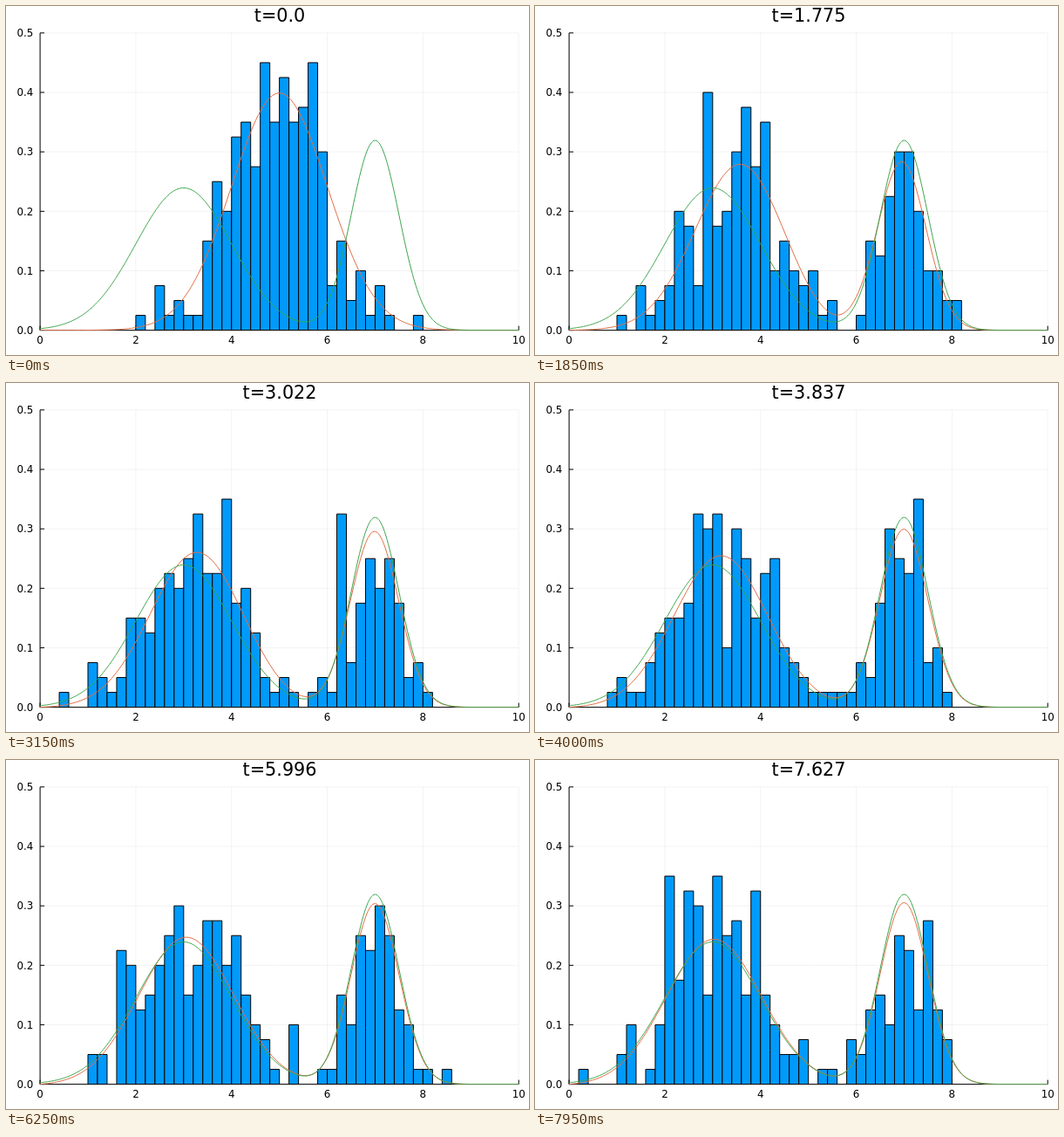
Animation, 600 px wide and 400 px high, one loop 8 s. Source, as an HTML page with a canvas:

```html
<!DOCTYPE html>
<html lang="en">
<head>
<meta charset="utf-8">
<title>Langevin sampling</title>
<style>
  html, body { margin: 0; width: 100%; height: 100%; overflow: hidden; background: #fff; }
  canvas { display: block; }
</style>
</head>
<body>
<canvas id="stage" width="600" height="400"></canvas>
<script>
const ctx = document.getElementById('stage').getContext('2d');
const STEPS = 160, STEP_MS = 50, DT = 0.047968;
const LEFT = 39.1, RIGHT = 588.19, TOP = 30.87, BOTTOM = 371.61;
const px = x => LEFT + x * (RIGHT - LEFT) / 10;
const py = y => BOTTOM - y * (BOTTOM - TOP) / 0.5;

const normal = (x, mean, sd) =>
  Math.exp(-(((x - mean) / sd) ** 2) / 2) / (sd * Math.sqrt(2 * Math.PI));
const leftPart = x => 0.6 * normal(x, 3, 1);
const rightPart = x => 0.4 * normal(x, 7, 0.5);
const target = x => leftPart(x) + rightPart(x);
const score = x => (leftPart(x) * (3 - x) + rightPart(x) * 4 * (7 - x)) / target(x);

// Density of dX = score/2 dt + dW on [0, 10], held at zero on both ends.
function solveDensity() {
  const dx = 0.05, count = 201, substeps = 40;
  const rate = 0.5 * DT / substeps / dx ** 2;
  const xs = Array.from({ length: count }, (_, i) => i * dx);
  const stationary = xs.map(target);
  const between = xs.map(x => target(x + dx / 2));
  const density = xs.map(x => normal(x, 5, 1));
  const history = [];
  for (let step = 0; step < STEPS; step++) {
    history.push(density.map((y, i) => [xs[i], y]));
    for (let s = 0; s < substeps; s++) {
      let inflow = 0;
      for (let i = 0; i < count - 1; i++) {
        const outflow = rate * between[i] *
          (density[i] / stationary[i] - density[i + 1] / stationary[i + 1]);
        density[i] += inflow - outflow;
        inflow = outflow;
      }
      density[0] = density[count - 1] = 0;
    }
  }
  return history;
}

function seededRandom(seed) {
  return () => {
    seed = (seed + 0x6D2B79F5) | 0;
    let h = Math.imul(seed ^ (seed >>> 15), 1 | seed);
    h = (h + Math.imul(h ^ (h >>> 7), 61 | h)) ^ h;
    return ((h ^ (h >>> 14)) >>> 0) / 4294967296;
  };
}

// Histogram of 200 walkers; the first bin of the starting counts is [2, 2.2).
function simulateWalkers() {
  const random = seededRandom(12);
  const gauss = () => Math.sqrt(-2 * Math.log(1 - random())) * Math.cos(2 * Math.PI * random());
  const startCounts = [1, 0, 3, 1, 2, 1, 1, 6, 10, 8, 13, 14, 11, 18, 14,
                       17, 14, 15, 18, 12, 3, 6, 2, 4, 1, 3, 1, 0, 0, 1];
  let walkers = startCounts.flatMap((n, bin) =>
    Array.from({ length: n }, () => 2 + 0.2 * (bin + 0.02 + 0.96 * random())));
  const history = [];
  for (let step = 0; step < STEPS; step++) {
    const bins = new Array(50).fill(0);
    for (const x of walkers) {
      const bin = Math.floor(x * 5);
      if (bin >= 0 && bin < 50) bins[bin]++;
    }
    history.push(bins);
    walkers = walkers.map(x => x + score(x) / 2 * DT + Math.sqrt(DT) * gauss());
  }
  return history;
}

const densities = solveDensity();
const histograms = simulateWalkers();
const targetCurve = Array.from({ length: 401 }, (_, i) => [i / 40, target(i / 40)]);

function line(x1, y1, x2, y2, color, width) {
  ctx.strokeStyle = color;
  ctx.lineWidth = width;
  ctx.beginPath();
  ctx.moveTo(x1, y1);
  ctx.lineTo(x2, y2);
  ctx.stroke();
}

function curve(points, color) {
  ctx.strokeStyle = color;
  ctx.lineWidth = 1;
  ctx.beginPath();
  for (const [x, y] of points) ctx.lineTo(px(x), py(y));
  ctx.stroke();
}

function text(label, x, y, size, align) {
  ctx.font = `${size}px "DejaVu Sans", sans-serif`;
  ctx.textAlign = align;
  ctx.fillStyle = '#000';
  ctx.fillText(label, x, y);
}

function drawAxes() {
  const grid = 'rgba(0,0,0,0.1)';
  for (let i = 0; i <= 5; i++) {
    const x = px(2 * i), y = py(i / 10);
    line(x, TOP, x, BOTTOM, grid, 0.5);
    line(LEFT, y, RIGHT, y, grid, 0.5);
    line(x, BOTTOM, x, BOTTOM - 5, '#000', 1);
    line(LEFT, y, LEFT + 5, y, '#000', 1);
    text(String(2 * i), x, 387.2, 11.85, 'center');
    text((i / 10).toFixed(1), 31.3, y + 4.3, 11.85, 'right');
  }
  line(LEFT, TOP, LEFT, BOTTOM, '#000', 1);
  line(LEFT, BOTTOM, RIGHT, BOTTOM, '#000', 1);
}

function drawBars(bins) {
  ctx.fillStyle = '#009afa';
  ctx.strokeStyle = '#000';
  ctx.lineWidth = 1;
  bins.forEach((n, bin) => {
    if (!n) return;
    const x = px(bin / 5), y = py(n * 0.025);
    ctx.beginPath();
    ctx.rect(x, y, px(0.2) - px(0), BOTTOM - y);
    ctx.fill();
    ctx.stroke();
  });
}

function timeLabel(t) {
  const rounded = Number(t.toFixed(3));
  return 't=' + (Number.isInteger(rounded) ? rounded.toFixed(1) : rounded);
}

function draw() {
  const step = Math.floor(performance.now() / STEP_MS) % STEPS;
  ctx.fillStyle = '#fff';
  ctx.fillRect(0, 0, 600, 400);
  drawAxes();
  text(timeLabel(step * DT), (LEFT + RIGHT) / 2 + 0.4, 18.14, 20.74, 'center');
  ctx.save();
  ctx.beginPath();
  ctx.rect(LEFT - 0.5, TOP - 0.5, RIGHT - LEFT + 1, BOTTOM - TOP + 1);
  ctx.clip();
  drawBars(histograms[step]);
  curve(densities[step], '#e26f46');
  curve(targetCurve, '#3da44d');
  ctx.restore();
  requestAnimationFrame(draw);
}
draw();
</script>
</body>
</html>
```
